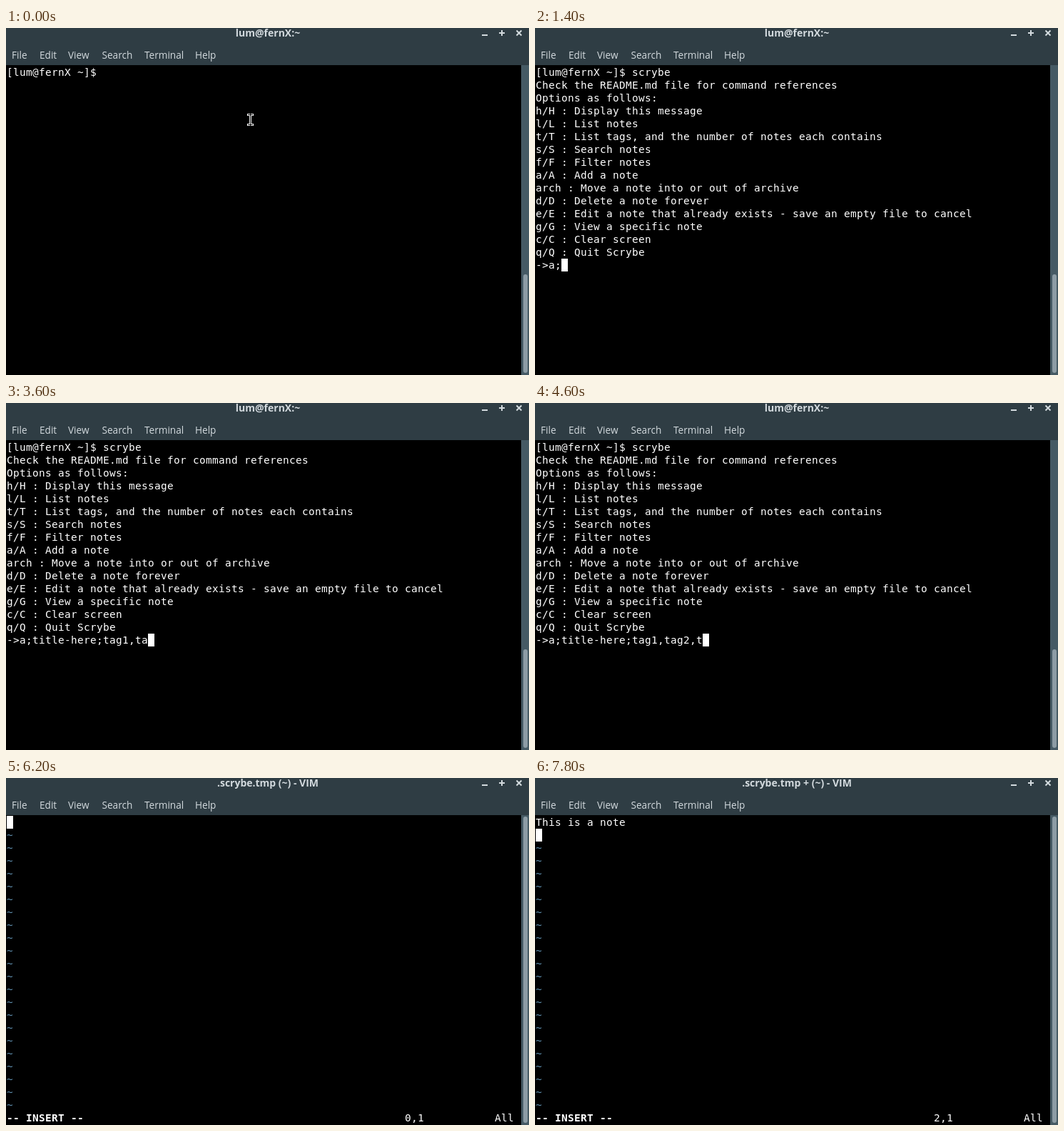
An HTML page with a canvas that plays this animation: 733 by 486 pixels, repeating every 8000 ms.

```html
<!DOCTYPE html>
<html lang="en">
<head>
<meta charset="utf-8">
<title>Terminal notes</title>
<style>
html, body { margin: 0; width: 100%; height: 100%; overflow: hidden; background: #000; }
canvas { display: block; }
</style>
</head>
<body>
<canvas id="stage" width="733" height="486"></canvas>
<script>
const ctx = document.getElementById('stage').getContext('2d');
const LOOP = 8000, CELL_W = 9, CELL_H = 18, LEFT = 1, TOP = 53;
const MONO = '14.4px "DejaVu Sans Mono", monospace';
const SANS = '"Open Sans", "Noto Sans", sans-serif';
const HOST = 'lum@fernX';
const PROMPT = `[${HOST} ~]$ `;
const HELP = [
  'Check the README.md file for command references',
  'Options as follows:',
  'h/H : Display this message',
  'l/L : List notes',
  't/T : List tags, and the number of notes each contains',
  's/S : Search notes',
  'f/F : Filter notes',
  'a/A : Add a note',
  'arch : Move a note into or out of archive',
  'd/D : Delete a note forever',
  'e/E : Edit a note that already exists - save an empty file to cancel',
  'g/G : View a specific note',
  'c/C : Clear screen',
  'q/Q : Quit Scrybe'
];

// Each run: start time, then one key per 100 ms. '\b' deletes, '\0' is a pause.
const SHELL_KEYS = [[200, 'scrybe']];
const NOTE_KEYS = [
  [1200, 'a\0;'], [1600, 'title\0-he'], [2500, 'r'], [2500, 'e'],
  [2700, ';tag'], [3200, '1\0,'], [3600, 't'], [3600, 'ag'],
  [3900, ','], [4100, '\b2\0,'], [4600, 'tag'], [5000, '3']
];
const VIM_KEYS = [[6300, 'This is a note']];

function typed(runs, t) {
  let text = '';
  for (const [start, keys] of runs) {
    [...keys].forEach((key, i) => {
      if (t < start + i * 100 || key === '\0') return;
      text = key === '\b' ? text.slice(0, -1) : text + key;
    });
  }
  return text;
}

function box(x, y, w, h, color) {
  ctx.fillStyle = color;
  ctx.fillRect(x, y, w, h);
}

function print(text, row, col = 0, color = '#fff', bold = false) {
  ctx.font = (bold ? 'bold ' : '') + MONO;
  ctx.fillStyle = color;
  ctx.textAlign = 'left';
  [...text].forEach((ch, i) => {
    if (ch !== ' ') ctx.fillText(ch, LEFT + (col + i) * CELL_W, TOP + row * CELL_H + 14);
  });
}

function cursor(row, col) {
  box(LEFT + col * CELL_W, TOP + row * CELL_H, CELL_W, CELL_H, '#fff');
}

function drawButtons() {
  box(667, 9, 8, 2, '#d3dade');
  box(691, 6, 8, 2, '#d3dade');
  box(694, 3, 2, 8, '#d3dade');
  ctx.strokeStyle = '#d3dade';
  ctx.lineWidth = 2;
  ctx.beginPath();
  ctx.moveTo(715.5, 3.5);
  ctx.lineTo(722.5, 10.5);
  ctx.moveTo(722.5, 3.5);
  ctx.lineTo(715.5, 10.5);
  ctx.stroke();
}

function drawWindow(title, thumbTop) {
  box(0, 0, 733, 486, '#000');
  box(0, 0, 733, 52, '#2f3d44');
  ctx.fillStyle = '#d3dade';
  ctx.textAlign = 'center';
  ctx.font = `bold 14px ${SANS}`;
  ctx.fillText(title, 367, 12);
  ctx.textAlign = 'left';
  ctx.font = `13.6px ${SANS}`;
  const menu = { File: 8, Edit: 47, View: 87, Search: 134.5, Terminal: 194, Help: 265 };
  for (const name in menu) ctx.fillText(name, menu[name], 43);
  drawButtons();
  box(722, 52, 11, 434, '#455a64');
  ctx.fillStyle = '#8c9ca5';
  ctx.beginPath();
  ctx.roundRect(725, thumbTop, 6, 483 - thumbTop, 3);
  ctx.fill();
}

function drawPointer() {
  box(338, 120, 4, 3, '#fff');
  box(343, 120, 4, 3, '#fff');
  box(338, 134, 4, 3, '#fff');
  box(343, 134, 4, 3, '#fff');
  box(341, 122, 3, 13, '#fff');
  box(339, 121, 3, 1, '#000');
  box(343, 121, 3, 1, '#000');
  box(339, 135, 3, 1, '#000');
  box(343, 135, 3, 1, '#000');
  box(342, 122, 1, 13, '#000');
}

function drawShell(t) {
  drawWindow(HOST + ':~', 345);
  const command = PROMPT + typed(SHELL_KEYS, t);
  print(command, 0);
  if (t < 100) return drawPointer();
  if (t < 900) return cursor(0, command.length);
  if (t < 1000) return cursor(1, 0);
  HELP.forEach((line, i) => print(line, i + 1));
  const entry = '->' + typed(NOTE_KEYS, t);
  print(entry, 15);
  if (t < 5500 || t >= 5700) cursor(15, entry.length);
}

function drawVim(t) {
  const note = typed(VIM_KEYS, t), insert = t >= 6200, entered = t >= 7800;
  drawWindow(`.scrybe.tmp ${note ? '+ ' : ''}(~) - VIM`, 54);
  print(note, 0);
  for (let row = entered ? 2 : 1; row < 23; row++) print('~', row, 0, '#5f8fae');
  if (insert) print('-- INSERT --', 23, 0, '#fff', true);
  else print('".scrybe.tmp" [New File]', 23);

  let place = '0,0-1';
  if (entered) place = '2,1';
  else if (note) place = '1,' + (note.length + 1);
  else if (insert) place = '0,1';
  print(place, 23, 62);
  print('All', 23, 76);
  if (t >= 6000) cursor(entered ? 1 : 0, entered ? 0 : note.length);
}

const began = performance.now();
function frame() {
  const t = (performance.now() - began) % LOOP;
  if (t < 5800) drawShell(t);
  else drawVim(t);
  requestAnimationFrame(frame);
}
frame();
</script>
</body>
</html>
```
